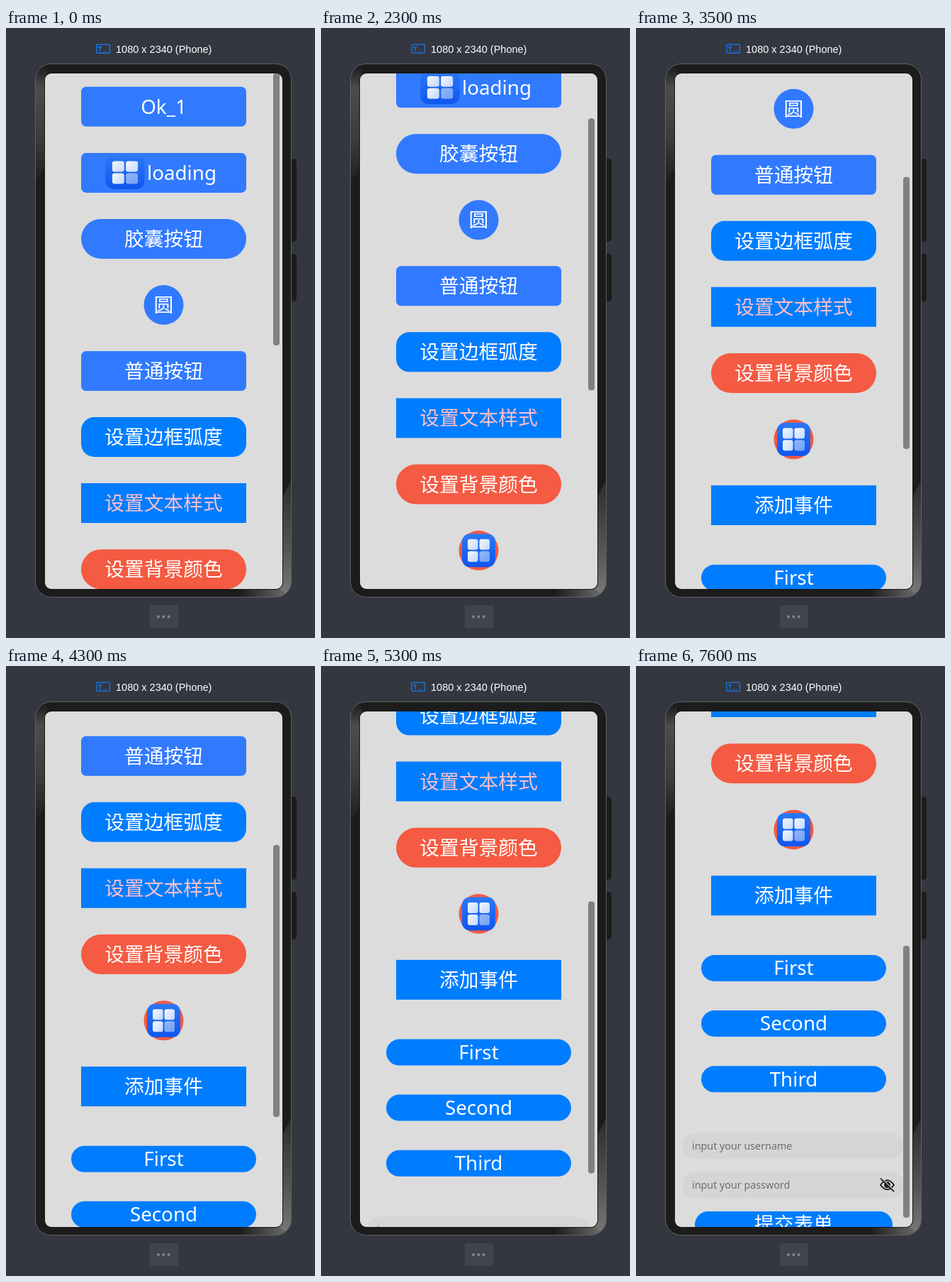
Animation, 436 px wide and 859 px high, one loop 8000 ms. Source, as an HTML page:

```html
<!DOCTYPE html>
<html lang="zh">
<head>
<meta charset="utf-8">
<style>
  html, body { margin: 0; width: 100%; height: 100%; overflow: hidden; background: #343740; }
  svg { display: block; width: 436px; height: 859px; }
  text { font-family: "Noto Sans", "Noto Sans CJK SC", sans-serif; }
  .label { font-size: 27.75px; font-weight: 500; text-anchor: middle; }
  .hint { font-size: 14.3px; fill: #6c6e70; }
  .title { font: 14.5px "Liberation Sans", Arial, sans-serif; fill: #fff; }
</style>
</head>
<body>
<svg viewBox="0 0 436 859">
  <defs>
    <clipPath id="screen"><rect x="55" y="64" width="335" height="726" rx="9"/></clipPath>
    <clipPath id="body"><rect x="41.5" y="50.5" width="361" height="751" rx="22"/></clipPath>
    <linearGradient id="sheenLeft" x1="0" y1="0" x2="0" y2="1">
      <stop offset="0" stop-color="#1c1c1c"/>
      <stop offset=".18" stop-color="#4c4c4c"/>
      <stop offset=".6" stop-color="#3c3c3c"/>
      <stop offset="1" stop-color="#1c1c1c"/>
    </linearGradient>
    <linearGradient id="sheenRight" x1="0" y1="0" x2="0" y2="1">
      <stop offset="0" stop-color="#2c2c2c"/>
      <stop offset=".6" stop-color="#555"/>
      <stop offset="1" stop-color="#7a7a7a"/>
    </linearGradient>
    <linearGradient id="sheenBottom">
      <stop offset="0" stop-color="#1c1c1c"/>
      <stop offset="1" stop-color="#747474"/>
    </linearGradient>
    <linearGradient id="iconBack" x1="0" y1="0" x2="0" y2="1">
      <stop offset="0" stop-color="#2a78f5"/>
      <stop offset="1" stop-color="#0f56ee"/>
    </linearGradient>
    <linearGradient id="tile" x1="0" y1="0" x2="1" y2="1">
      <stop offset="0" stop-color="#f4f8ff"/>
      <stop offset="1" stop-color="#c3d8fd"/>
    </linearGradient>
    <g id="icon">
      <rect width="47" height="47" rx="11" fill="url(#iconBack)"/>
      <g fill="url(#tile)">
        <rect x="8" y="7.5" width="14.5" height="15" rx="3"/>
        <rect x="24.5" y="7.5" width="14.5" height="15" rx="3"/>
        <rect x="8" y="24.5" width="14.5" height="15" rx="3"/>
        <rect x="24.5" y="24.5" width="14.5" height="15" rx="3" opacity=".55"/>
      </g>
    </g>
  </defs>

  <rect width="436" height="859" fill="#343740"/>
  <g id="badge" fill="none" stroke-width="1.5">
    <rect x="127.8" y="23.3" width="18.6" height="12" rx="1"/>
    <path d="M130 26.7h5.5M132.7 26.7v6M138 32.7h1M141 32.7h1"/>
  </g>
  <text class="title" x="155" y="35">1080 x 2340 (Phone)</text>

  <g fill="#1c1c1c">
    <rect x="398" y="184" width="12" height="117" rx="4.5"/>
    <rect x="398" y="318" width="12" height="67" rx="4.5"/>
  </g>
  <g clip-path="url(#body)">
    <rect x="41" y="50" width="362" height="752" fill="#1c1c1c"/>
    <path d="M41 54H58V190L41 222Z" fill="url(#sheenLeft)"/>
    <path d="M330 788H403V802H330Z" fill="url(#sheenBottom)"/>
    <path d="M403 636L386 668V790L403 802Z" fill="url(#sheenRight)"/>
  </g>
  <rect x="41.5" y="50.5" width="361" height="751" rx="22" fill="none" stroke="#606163"/>
  <rect x="54" y="63" width="337" height="728" rx="10" fill="#151515"/>
  <g clip-path="url(#screen)">
    <rect x="55" y="64" width="335" height="726" fill="#dcdcdc"/>
    <g id="content"></g>
    <rect id="bar" x="377" y="64" width="9" height="383" rx="4" fill="#808080"/>
  </g>

  <rect x="203" y="813" width="40" height="32" fill="#41444c"/>
  <g fill="#83868c">
    <circle cx="215" cy="829" r="2"/><circle cx="222.3" cy="829" r="2"/><circle cx="229.6" cy="829" r="2"/>
  </g>
</svg>
<script>
const BLUE = '#317aff', AZURE = '#007dff', RED = '#f55a42';
const CENTER = 222.5;
const byId = id => document.getElementById(id);

const box = (y, w, h, r, fill) =>
  `<rect x="${CENTER - w / 2}" y="${y}" width="${w}" height="${h}" rx="${r}" fill="${fill}"/>`;
const label = (text, y, color = '#fff') =>
  `<text class="label" x="${CENTER}" y="${y}" fill="${color}">${text}</text>`;
const button = (text, y, r, fill, color) => box(y, 233, 56, r, fill) + label(text, y + 38, color);
const pill = (text, y, w = 261) => box(y, w, 37, 18.5, AZURE) + label(text, y + 28.3);
const field = (text, y) =>
  `<rect x="65" y="${y}" width="313" height="37" rx="18.5" fill="#d4d6d5"/>` +
  `<text class="hint" x="79" y="${y + 23.5}">${text}</text>`;

byId('content').innerHTML = [
  button('Ok_1', 82.7, 7, BLUE),
  box(175.9, 233, 56, 7, BLUE),
  '<use href="#icon" transform="translate(140.5 180) scale(1.17 1)"/>',
  '<text class="label" style="font-weight:400" x="248" y="213.5" fill="#fff">loading</text>',
  button('胶囊按钮', 268.9, 28, BLUE),
  box(362, 56, 56, 28, BLUE) + label('圆', 400),
  button('普通按钮', 455, 7, BLUE),
  button('设置边框弧度', 548, 18.5, AZURE),
  button('设置文本样式', 641, 0, AZURE, '#ffc0cb'),
  button('设置背景颜色', 734.2, 28, RED),
  box(827.5, 56, 56, 28, RED),
  '<use href="#icon" x="199" y="832"/>',
  button('添加事件', 920.3, 0, AZURE),
  pill('First', 1032),
  pill('Second', 1110),
  pill('Third', 1188.3),
  field('input your username', 1282),
  field('input your password', 1337.5),
  `<g transform="translate(354.5 1355.7)" fill="none" stroke="#17191c" stroke-width="1.8" stroke-linecap="round">
    <path d="M-9.5 0Q0 -13 9.5 0Q0 13 -9.5 0Z"/>
    <circle r="3.5" fill="#17191c"/>
    <path d="M-8 -9L10 9" stroke="#d4d6d5" stroke-width="2"/>
    <path d="M-9 -8.5L9 9"/>
  </g>`,
  pill('提交表单', 1393, 279)
].join('');

// Each swipe: start ms, end ms, scroll offset reached
const swipes = [
  [700, 1300, 106], [2100, 3000, 223], [3000, 3800, 300], [3900, 4800, 436],
  [4800, 5400, 511.5], [5500, 5900, 548], [6300, 6700, 582], [6800, 7600, 625]
];
const ease = p => (1 - Math.cos(Math.PI * p)) / 2;

function scrollAt(time) {
  let offset = 0;
  for (const [start, end, target] of swipes) {
    const p = Math.min(1, Math.max(0, (time - start) / (end - start)));
    offset += (target - offset) * ease(p);
  }
  return offset;
}

function draw(now) {
  const time = now % 8000;
  const offset = scrollAt(Math.floor(time / 100) * 100);
  byId('content').setAttribute('transform', `translate(0 ${-offset})`);
  byId('bar').setAttribute('y', 64 + offset * 0.528);
  byId('badge').setAttribute('stroke', time < 500 ? '#117aed' : '#1670d8');
  requestAnimationFrame(draw);
}
draw(performance.now());
</script>
</body>
</html>
```
